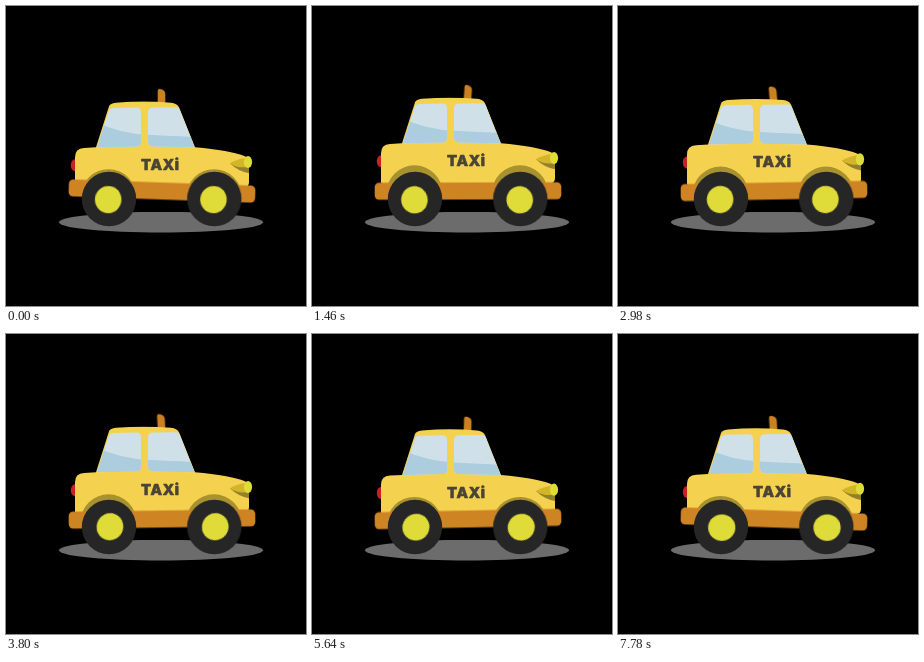
An HTML page without scripts that plays this animation: 300x300 px, repeating every 7800 ms.

```html
<!DOCTYPE html>
<html lang="en">
<head>
<meta charset="utf-8">
<title>Taxi</title>
<style>
  html, body { margin: 0; width: 100%; height: 100%; overflow: hidden; background: #000; }
  svg { display: block; width: 100vw; height: 100vh; }

  :root { --loop: 7.8s; --swing: cubic-bezier(.37, 0, .63, 1); }

  /* Each part completes a whole number of cycles per loop. */
  .bob, .lamp, .bumper {
    --half: calc(var(--loop) / var(--cycles) / 2);
    animation: var(--half) var(--swing) infinite alternate;
  }
  .bob { --cycles: 61; animation-name: bob; animation-delay: calc(var(--half) * -1.94); }
  .lamp { --cycles: 49; animation-name: lean; animation-delay: calc(var(--half) * -.5); transform-origin: 155.5px 95px; }
  .bumper { --cycles: 9; animation-name: tilt; transform-origin: 156px 185px; }
  .hub { animation: spin calc(var(--loop) / 63) linear infinite; }

  @keyframes bob { from { transform: translateY(2.2px); } to { transform: translateY(-2.2px); } }
  @keyframes lean { from { transform: rotate(-4.5deg); } to { transform: rotate(4.5deg); } }
  @keyframes tilt { from { transform: rotate(2deg); } to { transform: rotate(-1.1deg); } }
  @keyframes spin { to { transform: rotate(360deg); } }

  text {
    font: 800 15px Inter, "Open Sans", sans-serif;
    letter-spacing: .7px;
    fill: #4a4437; stroke: #4a4437; stroke-width: .7; stroke-linejoin: round;
  }
</style>
</head>
<body>
<svg viewBox="0 0 300 300">
  <defs>
    <path id="body" d="M69 179V149Q69 140 78 139.7L90 139L103 98Q104 95 110 94.5Q138 92.3 165 94.5Q171 95 173 99L189 139Q224 142 239 148Q243 150 243 157V174Q243 179 238 179L200 185H90Z"/>
    <path id="glass" d="M91 139L103 102Q104 100 107 99.8L131 99.3Q135 99.3 135 104V134Q135 138 131 138.2Z
      M142 104Q142 99.4 147 99.3L170 99Q173 99 174 102L188.500 139L147 138.200Q142 138 142 133Z"/>
    <clipPath id="in-body"><use href="#body"/></clipPath>
    <clipPath id="in-glass"><use href="#glass"/></clipPath>
    <g id="wheel">
      <circle r="27.2" fill="#262626"/>
      <g class="hub"><ellipse cx=".7" cy=".7" rx="13.6" ry="13.2" fill="#dfdb38"/></g>
    </g>
  </defs>

  <ellipse cx="155" cy="216.200" rx="102" ry="10.300" fill="#6c6c6c"/>

  <g class="bob">
    <path class="lamp" fill="#cb8022" d="M151.700 97V82.500Q151.700 80.300 155 81Q159.300 82 159.300 86V97Z"/>
    <ellipse cx="69" cy="157" rx="4.200" ry="6" fill="#c8231b"/>
    <use href="#body" fill="#f4d14e"/>
    <g clip-path="url(#in-body)" fill="#a8912f">
      <circle cx="102.500" cy="189" r="28"/>
      <circle cx="208" cy="189" r="28"/>
    </g>
    <use href="#glass" fill="#cfe0e8"/>
    <path clip-path="url(#in-glass)" fill="#abcddd" d="M88 113Q112 125 142 126.500T192 129V142H88Z"/>
    <path fill="#94802a" d="M224 155Q232 163 243 165V154Z"/>
    <path fill="#d3b52a" d="M224 155Q231 150.500 241 149.500V159Q230 160 224 155Z"/>
    <ellipse cx="242" cy="153.800" rx="4.100" ry="6.100" fill="#dfdb38"/>
    <text x="135" y="161.800">TAXi</text>
  </g>

  <rect class="bumper" x="62.700" y="176.500" width="186.600" height="17" rx="4.500" fill="#cf8423"/>

  <use href="#wheel" x="103" y="193"/>
  <use href="#wheel" x="208.300" y="193"/>
</svg>
</body>
</html>
```
